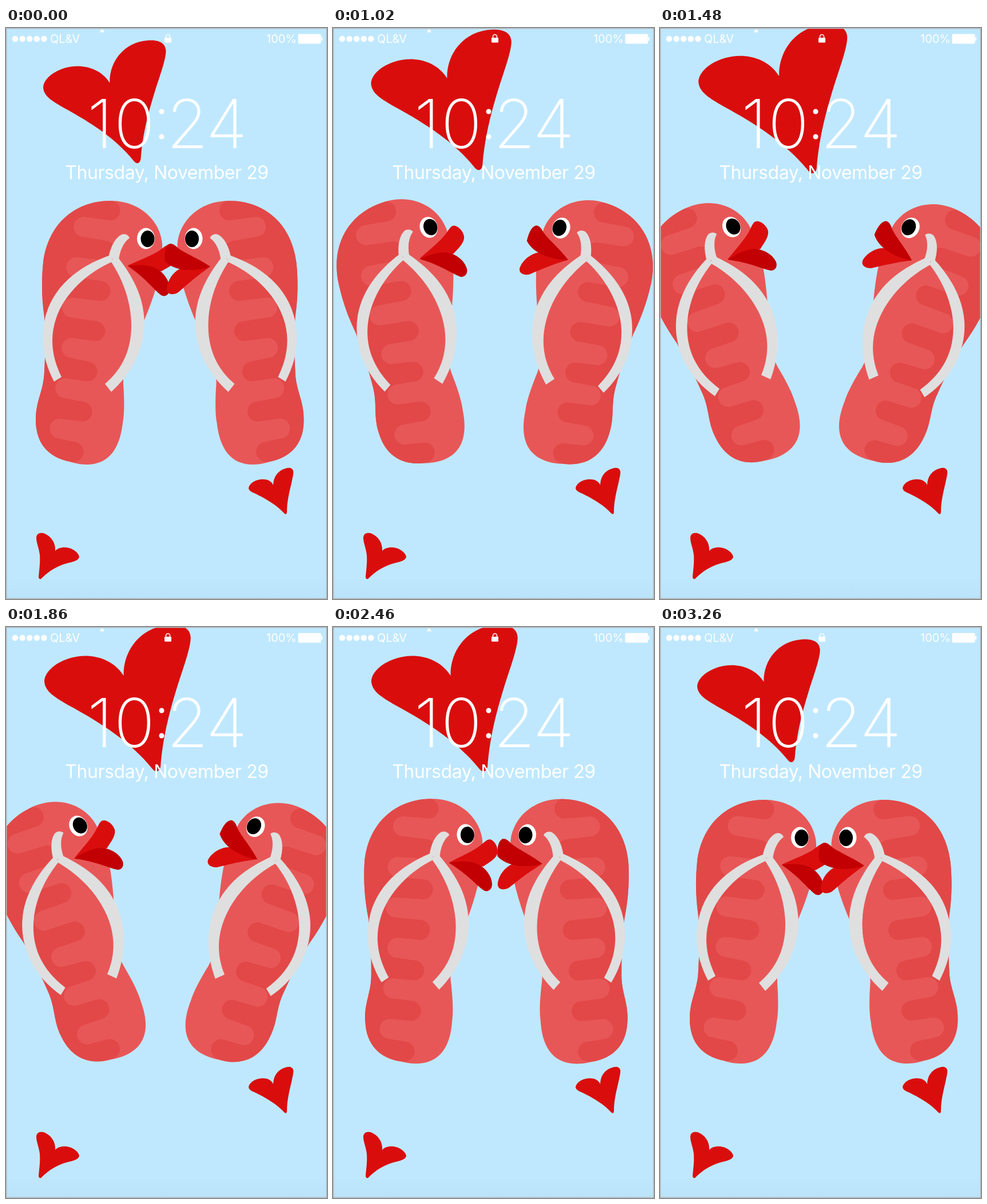
These frames come from a looping animation (561x998 px, 3280 ms). An HTML page:

```html
<!DOCTYPE html>
<html lang="en">
<head>
<meta charset="utf-8">
<title>Flip-flop kiss</title>
<style>
  html, body { margin: 0; width: 100%; height: 100%; overflow: hidden; background: #bfe8fe; }
  svg { display: block; width: 100vw; height: 100vh; }
  text { font-family: Inter, Roboto, "Liberation Sans", sans-serif; fill: #fff; }
  .light { fill: #e85757; }
  .dark { fill: #e24848; }
  .strap { fill: #dfdfdf; }
  .lip { fill: #da0d0d; }
  .lip-dark { fill: #c20003; }
  .clock { font-size: 118px; font-weight: 200; text-anchor: middle; }
  .date { font-size: 32px; letter-spacing: -.45px; text-anchor: middle; }
  .status { font-size: 20px; }
</style>
</head>
<body>
<svg viewBox="0 0 561 998" preserveAspectRatio="none">
  <defs>
    <linearGradient id="floor" x2="0" y2="1">
      <stop offset="0" stop-color="#bfe8fe"/>
      <stop offset="1" stop-color="#bae3f9"/>
    </linearGradient>
    <path id="sole" d="M183 302C235 302 270 338 273 378C274 420 262 462 242 510C220 555 204 590 205 622
      C207 650 207 675 204 690C199 735 180 763 141 763C128 763 118 760 107 757C75 749 52 727 52 685
      C52 650 66 635 67 600C69 565 69 540 67 505C62 470 62 440 65 410C73 345 118 302 183 302Z"/>
    <clipPath id="soleClip"><use href="#sole"/></clipPath>
    <g id="shoe">
      <use href="#sole" class="light"/>
      <path id="tread" class="dark" clip-path="url(#soleClip)"/>
      <g class="strap">
        <path d="M179 402C183 380 192 366 202 361C208 359 214 362 216 367C206 374 199 388 197 406Z"/>
        <path d="M182 397C117 420 66 464 64 540C64 570 72 595 84 618L97 610C85 585 81 565 81 545C82 480 135 430 187 408Z"/>
        <path d="M195 400C230 445 242 480 242 520C240 565 218 605 184 636L173 622C205 595 219 560 219 520C219 480 205 440 182 406Z"/>
      </g>
      <ellipse cx="244.500" cy="368" rx="15.500" ry="18.500" fill="#fff"/>
      <ellipse cx="247.500" cy="368.500" rx="12" ry="14.500"/>
    </g>
  </defs>

  <rect width="561" height="998" fill="#bfe8fe"/>
  <rect y="960" width="561" height="38" fill="url(#floor)"/>

  <g class="lip">
    <path id="heart" d="M181 96C168 75 145 67 125 67C95 67 66 85 65 104C66 120 82 128 100 139C150 166 192 194 222 231
      C227 238 233 238 235 229C238 190 246 155 260 110C269 82 279 55 279 40C278 25 265 21 247 22C205 25 180 60 181 96Z"/>
    <path d="M467 799C464 791 455 788 445 789C433 790 424 798 424 805C426 811 433 812 442 817C458 825 474 835 486 848
      C489 851 491 850 491 845C491 828 495 812 499 795C501 785 503 778 502 774C500 768 494 768 488 770C474 774 467 786 467 799Z"/>
    <path d="M86 914C87 900 79 888 66 883C59 881 53 884 53 891C53 900 58 910 59 921C60 935 58 948 57 959
      C57 963 60 965 63 961C74 950 88 941 105 936C118 933 128 930 128 924C126 916 116 909 106 908C98 907 90 909 86 914Z"/>
  </g>

  <g id="left">
    <use href="#shoe"/>
    <path class="lip" d="M213 415C235 405 258 397 272 386C280 380 284 376 290 380C298 386 300 398 298 404C294 414 280 420 272 425C250 424 235 420 213 416Z"/>
    <path class="lip-dark" d="M213 416C230 413 250 414 262 420C276 427 286 442 286 456C286 466 278 471 271 467C258 457 245 438 213 416Z"/>
  </g>
  <g id="right">
    <use href="#shoe" transform="translate(572.500) scale(-1 1)"/>
    <path class="lip" d="M357 417C335 415 315 414 300 423C287 432 281 447 281 457C282 467 293 467 301 462C318 447 335 432 357 417Z"/>
    <path class="lip-dark" d="M357 417C335 402 315 395 301 385C295 379 289 375 284 378C277 383 277 397 278 408C287 417 300 422 318 423C335 423 347 421 357 417Z"/>
  </g>

  <text class="clock" y="210" x="164.500 224.500">10</text>
  <g fill="#fff"><circle cx="272" cy="146" r="4.500"/><circle cx="272" cy="190" r="4.500"/></g>
  <text class="clock" y="210" x="317 385.500">24</text>
  <text class="date" x="281" y="263.500">Thursday, November 29</text>

  <g fill="#fff">
    <g id="signal"></g>
    <text class="status" x="77" y="26">QL&amp;V</text>
    <text class="status" x="455" y="26">100%</text>
    <path d="M164 7.500L166.500 2.500H169.500L172 7.500Z"/>
    <rect x="277" y="17" width="12" height="8.500" rx="1"/>
    <path d="M279.500 18V15A3.500 3.500 0 0 1 286.500 15V18" fill="none" stroke="#fff" stroke-width="1.600"/>
    <rect x="510.500" y="10.500" width="40" height="17" rx="2"/>
    <rect x="551" y="15.500" width="2" height="7" rx="1"/>
  </g>
  <rect x=".75" y=".75" width="559.500" height="996.500" fill="none" stroke="#b2b5b8" stroke-width="1.500"/>
</svg>
<script>
  const $ = id => document.getElementById(id);
  const LOOP = 3280, START = 875;

  // Interlocking rounded fingers down the sole
  function treadPath() {
    const r = 17.4, nx = -.115 * r, ny = .993 * r;
    const tips = [200, 191, 183, 174, 160, 151, 136];
    const gaps = [118, 105, 98, 97, 86, 76];
    const cap = (x, y, sweep) =>
      `L${x - nx} ${y - ny}A${r} ${r} 0 0 ${sweep} ${x + nx} ${y + ny}`;
    let d = 'M30 290L183 290';
    tips.forEach((x, i) => {
      d += cap(x - r, 319 + 70.3 * i, 1);
      if (i < gaps.length) d += cap(gaps[i] + r, 347.5 + 70.5 * i, 0);
    });
    return d + 'L30 750Z';
  }

  // Critically damped spring from 0 to 1
  function spring(ms) {
    if (ms <= 0) return 0;
    const x = ms * .0153;
    return 1 - (1 + x) * Math.exp(-x);
  }

  function draw(now) {
    const u = (now % LOOP - START + LOOP) % LOOP;
    const out = spring(u), settle = spring(u - 530);
    const angle = 28.1 * out - .5 * settle - 27.6 * spring(u - 1340);
    const size = 1 + .225 * out - .03 * settle - .195 * spring(u - 1980);
    $('left').setAttribute('transform', `rotate(${-angle * .97} 143 606)`);
    $('right').setAttribute('transform', `rotate(${angle} 420.4 579)`);
    $('heart').setAttribute('transform', `translate(55 152) scale(${size}) translate(-55 -152)`);
  }

  $('tread').setAttribute('d', treadPath());
  $('signal').innerHTML = [0, 1, 2, 3, 4]
    .map(i => `<circle cx="${16 + 12.6 * i}" cy="19" r="5.3"/>`).join('');

  let begin = null;
  function tick(now) {
    if (begin === null) begin = now;
    draw(now - begin);
    requestAnimationFrame(tick);
  }
  draw(0);
  requestAnimationFrame(tick);
</script>
</body>
</html>
```
